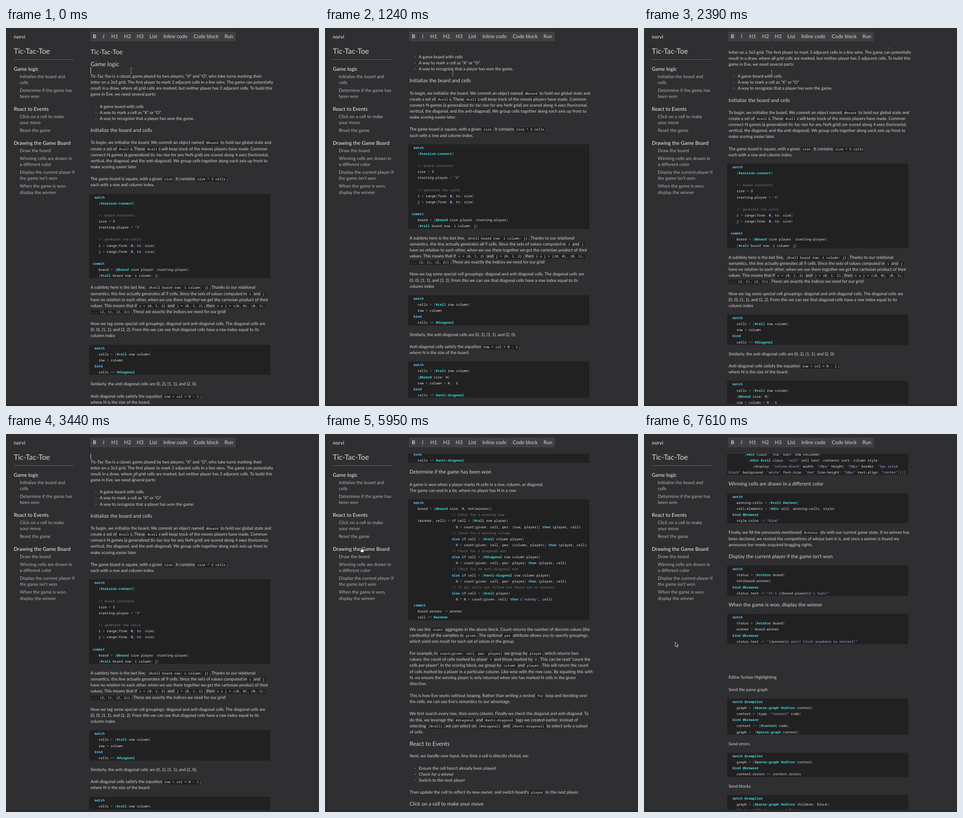
Write an HTML page that moves like this. It is 681 px wide and 822 px high and loops after 8000 ms.

```html
<!DOCTYPE html>
<html lang="en">
<head>
<meta charset="utf-8">
<title>Notebook editor</title>
<style>
html, body { margin: 0; width: 100%; height: 100%; overflow: hidden; background: #2f2f31; }
body { position: relative; font: 9.2px/13.13px Lato, sans-serif; color: #d6d6d6; text-rendering: geometricPrecision; }
body > * { position: absolute; }
#brand { left: 17px; top: 13px; font-size: 11px; font-weight: 500; color: #dedede; }
#title { left: 17px; top: 41px; width: 131px; height: 27px; line-height: 19px; font-size: 16px; border-bottom: 1px solid #636365; }
#nav { left: 17px; top: 69px; width: 131px; }
#nav b { display: block; margin: 13.5px 0 .8px; font-size: 11.1px; font-weight: 500; color: #e4e4e4; }
#nav a { display: block; margin: 4px 0 0 13px; font-size: 9.9px; color: #b2b2b3; white-space: nowrap; }
#nav .hover { color: #55b9ea; }
#bar { left: 183px; top: 8px; height: 21px; display: flex; gap: 1px; border-radius: 2px; overflow: hidden; background: #343436; font-size: 11px; line-height: 21px; text-align: center; white-space: nowrap; }
#bar > * { background: #404042; }
#view { left: 0; top: 43px; width: 681px; height: 774px; overflow: hidden; }
#doc { position: absolute; left: 184px; width: 391px; white-space: pre; }
#doc > div { min-height: 13.13px; }
#edge { left: 0; bottom: 0; width: 100%; height: 4px; background: #2a2a2c; }
.h1 { font-size: 14.2px; }
.h2 { font-size: 12.8px; }
.h3 { font-size: 11px; }
.li i { display: inline-block; width: 10px; margin-left: 10px; font-style: normal; }
.code, code { background: #212122; }
.code { margin-left: -3px; padding-left: 3px; }
.code > span, code { font-family: "Noto Sans Mono", "DejaVu Sans Mono", monospace; font-size: 7.3px; font-weight: 500; line-height: 0; color: #e4e4e4; }
code { padding: 0 2.6px; border-radius: 2px; }
.code .note { color: #7d7d7d; }
.str, .num { color: #b9a6ff; }
.tag { color: #38dde2; }
.key { color: #5cc2f4; }
.key, .tag, .num { font-weight: 600; }
.op { color: #939393; }
.code u { color: #e4e4e4; text-decoration: none; }
#caret { position: absolute; left: 0; top: 39.4px; width: 1px; height: 14px; background: #d8d8d8; }
#pointer { left: 0; top: 0; width: 12px; height: 14px; overflow: visible; }
</style>
</head>
<body>
<div id="brand">norvi</div>
<div id="title">Tic-Tac-Toe</div>
<div id="nav">
<b>Game logic</b>
<a>Initialize the board and<br>cells</a>
<a>Determine if the game has<br>been won</a>
<b>React to Events</b>
<a>Click on a cell to make<br>your move</a>
<a>Reset the game</a>
<b>Drawing the Game Board</b>
<a>Draw the board</a>
<a>Winning cells are drawn in<br>a different color</a>
<a>Display the current player if<br>the game isn't won</a>
<a>When the game is won,<br>display the winner</a>
</div>
<div id="bar">
<b style="width:19px">B</b><i style="width:19px">I</i><span style="width:27px">H1</span><span style="width:27px">H2</span><span style="width:26px">H3</span><span style="width:29px">List</span><span style="width:65px">Inline code</span><span style="width:67px">Code block</span><span style="width:30px">Run</span>
</div>
<div id="view"><div id="doc"></div></div>
<div id="edge"></div>
<svg id="pointer">
<path id="beam" d="M-2-6q2 0 2 1.5v9q0 1.5-2 1.5M2-6q-2 0-2 1.5M2 6q-2 0-2-1.5" fill="none" stroke="#8c8c8c"/>
<path id="hand" d="M-.8 .6q.8-1 1.6 0V4.3l4 .9q1.2.3 1 1.6L5.2 9.5 4.6 11.5H0L-3.4 7.6q-.3-1.2.9-.9L-.8 7.8z" fill="#f2f2f2" stroke="#222" stroke-width=".8"/>
<path id="arrow" d="M0 0V9.5L2.3 7.5 3.8 11 5.3 10.3 3.8 7H7z" fill="#151515" stroke="#eee" stroke-width=".9"/>
</svg>

<script type="text/plain" id="text"># Tic-Tac-Toe

## Game logic

Tic-Tac-Toe is a classic game played by two players, "X" and "O", who take turns marking their
letter on a 3x3 grid. The first player to mark 3 adjacent cells in a line wins. The game can potentially
result in a draw, where all grid cells are marked, but neither player has 3 adjacent cells. To build this
game in Eve, we need several parts:

- A game board with cells
- A way to mark a cell as "X" or "O"
- A way to recognize that a player has won the game.

### Initialize the board and cells

To begin, we initialize the board. We commit an object named `@board` to hold our global state and
create a set of `#cell`s. These `#cell`s will keep track of the moves players have made. Common
connect-N games (a generalized tic-tac-toe for any NxN grid) are scored along 4 axes (horizontal,
vertical, the diagonal, and the anti-diagonal). We group cells together along each axis up front to
make scoring easier later.

The game board is square, with a given `size`. It contains `size ^ 2 cells`,
each with a row and column index.

|  match
|    [#session-connect]
|
|    // board constants
|    size = 3
|    starting-player = "X"
|
|    // generate the cells
|    i = range[from: 0, to: size]
|    j = range[from: 0, to: size]
|
| commit
|    board = [@board size player: starting-player]
|    [#cell board row: i column: j]

A subtlety here is the last line, `[#cell board row: i column: j]`. Thanks to our relational
semantics, this line actually generates all 9 cells. Since the sets of values computed in `i` and `j`
have no relation to each other, when we use them together we get the cartesian product of their
values. This means that if `i = {0, 1, 2}` and `j = {0, 1, 2}`, then `i x j = {(0, 0), (0, 1),`
`... (2, 1), (2, 2)}`. These are exactly the indices we need for our grid!

Now we tag some special cell groupings: diagonal and anti-diagonal cells. The diagonal cells are
(0, 0), (1, 1), and (2, 2). From this we can see that diagonal cells have a row index equal to its
column index

|  match
|    cells = [#cell row column]
|    row = column
|  bind
|    cells += #diagonal

Similarly, the anti-diagonal cells are (0, 2), (1, 1), and (2, 0).

Anti-diagonal cells satisfy the equation `row + col = N - 1`,
where N is the size of the board.

|  match
|    cells = [#cell row column]
|    [@board size: N]
|    row + column = N - 1
|  bind
|    cells += #anti-diagonal

### Determine if the game has been won

A game is won when a player marks N cells in a row, column, or diagonal.
The game can end in a tie, where no player has N in a row.

|  match
|    board = [@board size: N, not(winner)]
|                     // Check for a winning row
|    (winner, cell) = if cell = [#cell row player]
|                       N = count[given: cell, per: (row, player)] then (player, cell)
|                     // Check for a winning column
|                     else if cell = [#cell column player]
|                       N = count[given: cell, per: (column, player)] then (player, cell)
|                     // Check for a diagonal win
|                     else if cell = [#diagonal row column player]
|                       N = count[given: cell, per: player] then (player, cell)
|                     // Check for an anti-diagonal win
|                     else if cell = [#anti-diagonal row column player]
|                       N = count[given: cell, per: player] then (player, cell)
|                     // If all cells are filled but there are no winners
|                     else if cell = [#cell player]
|                       N * N = count[given: cell] then ("nobody", cell)
|  commit
|    board.winner := winner
|    cell += #winner

We use the `count` aggregate in the above block. Count returns the number of discrete values (the
cardinality) of the variables in `given`. The optional `per` attribute allows you to specify groupings,
which yield one result for each set of values in the group.

For example, in `count[given: cell, per: player]` we group by `player`, which returns two
values: the count of cells marked by player `X` and those marked by `O`. This can be read "count the
cells per player". In the scoring block, we group by `column` and `player`. This will return the count
of cells marked by a player in a particular column. Like wise with the row case. By equating this with
N, we ensure the winning player is only returned when she has marked N cells in the given
direction.

This is how Eve works without looping. Rather than writing a nested `for` loop and iterating over
the cells, we can use Eve's semantics to our advantage.

We first search every row, then every column. Finally we check the diagonal and anti-diagonal. To
do this, we leverage the `#diagonal` and `#anti-diagonal` tags we created earlier; instead of
selecting `[#cell]`, we can select on `[#diagonal]` and `[#anti-diagonal]` to select only a subset
of cells.

## React to Events

Next, we handle user input. Any time a cell is directly clicked, we:

- Ensure the cell hasn't already been played
- Check for a winner
- Switch to the next player

Then update the cell to reflect its new owner, and switch board's `player` to the next player.

### Click on a cell to make your move

|  match
|    [#click #direct-target element: [#div cell]]
|    not(cell.player)
|    board = [@board player: current, not(winner)]
|    next_player = if current = "X" then "O"
|                  else "X"
|  commit
|    board.player := next_player
|    cell.player := current

Since games of tic-tac-toe are often very short and extremely competitive, it's imperative that it
be quick and easy to begin a new match. When the game is over (the board has a `winner`
attribute), a click anywhere on the drawing area will reset the game for another round of play.

A reset consists of:

- Clearing the board of a `winner`
- Clearing all of the cells
- Removing the `#winner` tag from the winning cell set

### Reset the game

|  match
|    [#click]
|    board = [@board winner]
|    cell = [#cell player]
|  commit
|    board.winner := none
|    cell.player := none
|    cell -= #winner

## Drawing the Game Board

We've completed the game logic, so now we draw the board. Each cell is a `#div` in a row.

### Draw the board

|  match
|    board = [@board]
|    cell = [#cell board row column]
|    contents = if cell.player then cell.player
|               else ""
|  bind @browser
|    [#div board style: [font-family: "sans-serif"] children:
|      [#div #status board class: "status"]
|      [#div class: "board" style: [color: "black"] children:
|        [#div class: "row" sort: row children:
|          [#div #cell class: "cell" cell text: contents sort: column style:
|            [display: "inline-block" width: "50px" height: "50px" border: "1px solid↵black" background: "white" font-size: "2em" line-height: "50px" text-align: "center"]]]]

### Winning cells are drawn in a different color

|  match
|    winning-cells = [#cell #winner]
|    cell-elements = [#div cell: winning-cells, style]
|  bind @browser
|    style.color := "blue"

Finally, we fill the previously mentioned `#status` div with our current game state. If no winner has
been declared, we remind the competitors of whose turn it is, and once a winner is found we
announce her newly-acquired bragging rights.

### Display the current player if the game isn't won

|  match
|    status = [#status board]
|    not(board.winner)
|  bind @browser
|    status.text += "It's {{board.player}}'s turn!"

### When the game is won, display the winner

|  match
|    status = [#status board]
|    winner = board.winner
|  bind @browser
|    status.text += "{{winner}} wins! Click anywhere to restart!"





Editor Syntax Highlighting

Send the parse graph

|  match @compiler
|    graph = [#parse-graph #editor context]
|    context = [type: "context" code]
|  bind @browser
|    context <- [#context code]
|    graph <- [#parse-graph context]

Send errors

|  match @compiler
|    graph = [#parse-graph #editor context]
|  bind @browser
|    context.errors += context.errors

Send blocks

|  match @compiler
|    graph = [#parse-graph #editor children: block]
|    block = [#block name sort line]
|  bind @browser
|    block.sort := line</script>

<script>
const $ = id => document.getElementById(id);
const doc = $('doc'), pointer = $('pointer');

const TOKEN = /(\/\/.*)|("[^"]*")|([#@][\w-]+)|\b(match|commit|bind|if|then|else)\b|\b(\d+)\b|([\[\]:=+*]+|&lt;-| -=? )/g;
const KINDS = ['note', 'str', 'tag', 'key', 'num', 'op'];

function highlight(code) {
  return code.replace(TOKEN, (token, ...groups) => {
    const kind = KINDS[groups.findIndex(Boolean)];
    return `<span class="${kind}">${token.replace(/{{.*?}}/g, '<u>$&</u>')}</span>`;
  }).replace('↵', '\n');
}

function renderLine(raw) {
  const line = raw.replace(/</g, '&lt;');
  if (line[0] === '|') return `<div class="code"><span>${highlight(line.slice(1))}</span></div>`;
  const html = line.replace(/`(.*?)`/g, '<code>$1</code>');
  const heading = html.match(/^(#+) (.*)/);
  if (heading) return `<div class="h${heading[1].length}">${heading[2]}</div>`;
  if (html.startsWith('- ')) return `<div class="li"><i>-</i>${html.slice(2)}</div>`;
  return `<div>${html}</div>`;
}

const TOP = 2.5;   // first line's offset inside the view
doc.style.top = TOP + 'px';
doc.innerHTML = $('text').textContent.split('\n').map(renderLine).join('') + '<b id="caret"></b>';

const sections = doc.querySelectorAll('.h3');
const scrollFor = (index, y) => sections[index].getBoundingClientRect().top - y;
const wonScroll = scrollFor(1, 76.4), winningScroll = scrollFor(5, 102.4);

const links = [...document.querySelectorAll('#nav > *')].map(el => ({ el, box: el.getBoundingClientRect() }));
const linkAt = ([x, y]) => links.find(({ box }) =>
  x >= box.left && x <= box.right && y >= box.top && y <= box.bottom);

// The picture only refreshes at these moments and holds in between.
const TICKS = [0, 300, 660, 810, 960, 1100, 1240, 1410, 1890, 2060, 2230, 2390, 2690, 3440, 3610,
  3940, 4100, 4250, 4400, 4570, 5170, 5330, 5480, 5640, 5790, 5950, 6100, 6250, 6400, 6550,
  6850, 7000, 7290, 7450, 7610];

const SCROLL = [[0, 0], [600, 0], [1240, 107.7], [1410, 112], [1750, 112], [2390, 65.6], [2690, 64],
  [3300, 64], [3440, 44.3], [3800, 44.3], [4100, 0], [5100, 0], [5480, wonScroll],
  [7200, wonScroll], [7450, winningScroll]];

const MOUSE = [[0, 272, 93], [600, 272, 93], [660, 278, 98], [3800, 278, 98], [4400, 66, 138],
  [5600, 66, 138], [5790, 77, 238], [5950, 79, 246], [6100, 79, 247], [6250, 78, 255],
  [6400, 77, 261], [6550, 76, 281], [7000, 76, 288], [7290, 76, 288], [7450, 72, 380], [7610, 68, 452.5]];

function sample(track, t) {
  const next = track.findIndex(key => key[0] > t);
  if (next < 0) return track.at(-1).slice(1);
  const [t0, ...from] = track[next - 1], [t1, ...to] = track[next];
  return from.map((v, i) => v + (to[i] - v) * (t - t0) / (t1 - t0));
}

function draw(now) {
  const t = now % 8000;
  const step = TICKS.findLastIndex(tick => tick <= t), tick = TICKS[step];

  doc.style.top = TOP - sample(SCROLL, tick)[0] + 'px';
  $('caret').hidden = Math.floor((tick + 230) / 530) % 2 === 1;

  const mouse = sample(MOUSE, tick);
  const shape = linkAt(mouse) ? 'hand' : mouse[0] > 181 ? 'beam' : 'arrow';
  for (const path of pointer.children) path.style.display = path.id === shape ? '' : 'none';
  pointer.style.transform = `translate(${mouse[0]}px, ${mouse[1]}px)`;

  // Link highlighting trails the pointer by one refresh.
  const hovered = linkAt(sample(MOUSE, TICKS[Math.max(0, step - 1)]));
  for (const link of links) link.el.classList.toggle('hover', link === hovered);

  requestAnimationFrame(draw);
}
requestAnimationFrame(draw);
</script>
</body>
</html>
```
